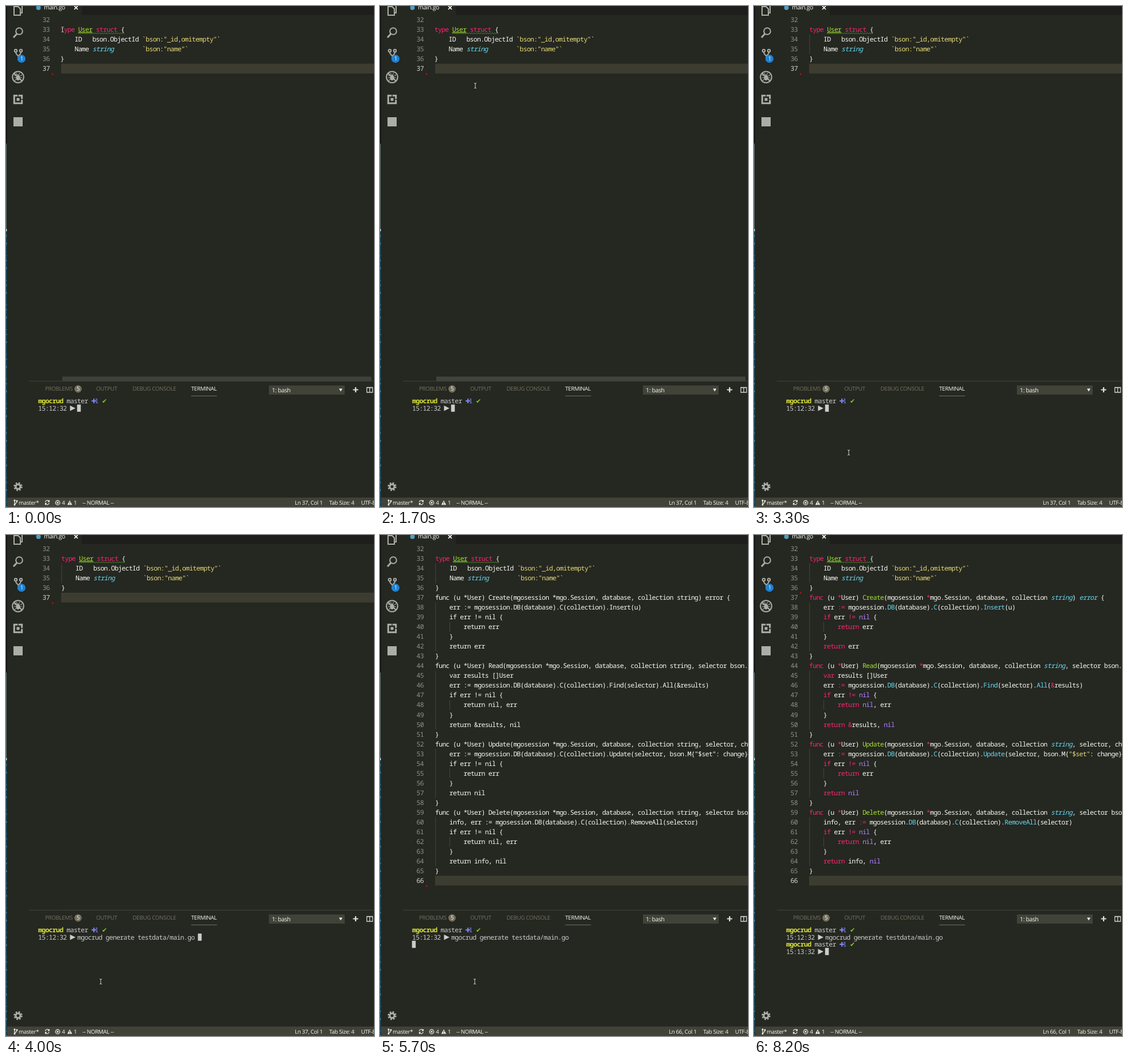
Write an HTML page that moves like this. It is 641 px wide and 874 px high and loops after 8.3 s.

```html
<!DOCTYPE html>
<html lang="en">
<head>
<meta charset="utf-8">
<title>Code generation in an editor</title>
<style>
html, body { margin: 0; width: 100%; height: 100%; overflow: hidden; background: #252721; }
svg { display: block; }
text { white-space: pre; text-rendering: geometricPrecision; fill: #f8f8f2; }
.code { font: 11.5px "Noto Sans Mono", "DejaVu Sans Mono", monospace; letter-spacing: -.71px; }
.ui { font: 9.8px "Open Sans", "Noto Sans", sans-serif; letter-spacing: -.035em; }
.big { font-size: 10.5px; }
.dim { fill: #75715e; }
.num { fill: #90908a; text-anchor: end; }
.on { fill: #d8d8d4; }
.term { fill: #ccc; }
.dir { fill: #dbe43a; font-weight: bold; }
.sym { font: 11px "DejaVu Sans", sans-serif; }
.git { fill: #7d85f5; }
.ok { fill: #7ecb20; }
.str { fill: #e6db74; }
.key { fill: #f92672; }
.nil { fill: #ae81ff; }
.typ { fill: #66d9ef; font-style: italic; }
.def { fill: #a6e22e; }
.call { fill: #66d9ef; }
.line { fill: none; stroke: #adada8; stroke-width: 2; }
.thick { stroke-width: 3; }
.thin { stroke-width: 1.2; }
</style>
</head>
<body>
<svg id="stage" width="641" height="874" viewBox="0 0 641 874"></svg>
<script>
const LOOP = 8300, COL = 6.19, LEFT = 96, PITCH = 17.03, BG = '#252721', ICON = '#adada8';
const lineY = n => 24 + PITCH * (n - 32);

const head = [
  'type User struct {',
  '    ID   bson.ObjectId `bson:"_id,omitempty"`',
  '    Name string        `bson:"name"`',
  '}'
];
const args = '(mgosession *mgo.Session, database, collection string';
const db = 'mgosession.DB(database).C(collection).';
const check = value => ['    if err != nil {', '        return ' + value, '    }'];
const body = [
  `func (u *User) Create${args}) error {`,
  `    err := ${db}Insert(u)`, ...check('err'), '    return err', '}',
  `func (u *User) Read${args}, selector bson.M)`,
  '    var results []User',
  `    err := ${db}Find(selector).All(&results)`, ...check('nil, err'), '    return &results, nil', '}',
  `func (u *User) Update${args}, selector, change`,
  `    err := ${db}Update(selector, bson.M{"$set": change})`, ...check('err'), '    return nil', '}',
  `func (u *User) Delete${args}, selector bson.M)`,
  `    info, err := ${db}RemoveAll(selector)`, ...check('nil, err'), '    return info, nil', '}'
];

const tokens = /(?<str>"[^"]*"|`[^`]*`)|(?<key>\b(?:func|type|struct|if|return|var)\b|:=|!=|[*&])|(?<nil>\bnil\b)|(?<typ>\b(?:string|error)\b)|(?<def>(?<=\) |type )\w+)|(?<call>(?<=\.)\w+(?=\())/g;
const esc = s => s.replace(/&/g, '&amp;');
const paint = code => code.replace(tokens, (word, ...rest) => {
  const groups = rest.at(-1);
  const kind = Object.keys(groups).find(k => groups[k]);
  return `<tspan class="${kind}">${esc(word)}</tspan>`;
});

const text = (x, y, cls, s) => `<text x="${x}" y="${y}" class="${cls}">${s}</text>`;
const path = (d, attrs = 'class="line"') => `<path d="${d}" ${attrs}/>`;
const rect = (x, y, w, h, fill, attrs = '') =>
  `<rect x="${x}" y="${y}" width="${w}" height="${h}" fill="${fill}" ${attrs}/>`;
const disc = (x, y, r, fill) => `<circle cx="${x}" cy="${y}" r="${r}" fill="${fill}"/>`;
const ring = (x, y, r, attrs = 'class="line"') => `<circle cx="${x}" cy="${y}" r="${r}" ${attrs}/>`;
const group = (id, inner) => `<g id="${id}">${inner}</g>`;

const listing = (lines, first, format) =>
  lines.map((s, i) => text(LEFT, lineY(first + i) + 4, 'code', format(s))).join('');
const guides = (lines, first) => lines.map((s, i) => {
  const depth = s.search(/\S/) / 4;
  return Array.from({ length: depth }, (_, k) =>
    rect(LEFT + .3 + k * 4 * COL, lineY(first + i) - PITCH / 2, 1, PITCH, '#464741')).join('');
}).join('');
const numbers = (from, to) => Array.from({ length: to - from + 1 }, (_, i) =>
  text(76, lineY(from + i) + 4, 'code num', from + i)).join('');

function underline() {
  const x = LEFT + 5 * COL;
  return path(`M${x} 48.5` + 'l2-1.6l2 1.6'.repeat(20), 'fill="none" stroke="#4f9a30" stroke-width=".9"') +
    rect(x, 45.8, 4 * COL, 1, '#a6e22e');
}

const prompt = (y, time) =>
  text(56, y + 4, 'code dir', 'mgocrud') + text(56 + 8 * COL, y + 4, 'code term', 'master') +
  text(148.5, y + 4, 'sym git', '✚') + text(154.5, y + 4, 'code git', '1') +
  text(167, y + 4, 'sym ok', '✔') +
  text(56, y + 16.5, 'code term', time) +
  path(`M111.5 ${y + 8}L121 ${y + 12.7}L111.5 ${y + 17.4}Z`, 'fill="#ccc"');

const activityBar =
  path('M18-6H24L28-2V12H25M14 1H21L25 5V16H14Z') +
  ring(23, 44, 5.8) + path('M19 48.5L13 55', 'class="line thick"') +
  ring(17, 78, 2.2) + ring(26, 78, 2.2) + path('M17 80Q17 84 21.5 87Q26 84 26 80M21.5 86V95') +
  disc(27, 92, 7, '#1f82d2') + text(24.8, 95.4, 'ui', '1') +
  ring(21, 124, 9.8) + `<ellipse cx="21" cy="125" rx="3.6" ry="5" fill="${ICON}"/>` +
  path('M14 120L17 122M28 120L25 122M14 125H28M15 130L18 128M27 130L24 128M18 117L20 120M24 117L22 120',
    'class="line thin"') +
  path('M14 117L28 131') +
  rect(14.3, 156.3, 13.4, 13.4, 'none', 'class="line thick"') +
  rect(18.5, 160.5, 5, 5, ICON) + path('M21 154V159M24.5 163H30', `stroke="${BG}" stroke-width="1.4"`) +
  rect(13, 194, 16, 16, ICON) +
  ring(21, 838.5, 6.2, 'class="line thick" stroke-dasharray="2.6 2.27"') +
  ring(21, 838.5, 4, 'class="line thick"');

const tabs =
  rect(40, 0, 601, 15.5, '#1e1f1c') + rect(40, 0, 92, 16, BG) +
  disc(56.5, 3, 4, '#4f9fc4') + text(66, 6.3, 'ui big', 'main.go') +
  path('M119 0L125 6M125 0L119 6', 'stroke="#fff" stroke-width="1.7"');

const panel =
  rect(40, 654, 601, 1, '#414339') +
  text(68, 671.3, 'ui dim', 'PROBLEMS') + disc(125.5, 668, 6.4, '#75715e') + text(123, 671.3, 'ui', '5') +
  text(157, 671.3, 'ui dim', 'OUTPUT') + text(220.5, 671.3, 'ui dim', 'DEBUG CONSOLE') +
  text(322.5, 671.3, 'ui', 'TERMINAL') + rect(322.5, 679.7, 45, 1, '#75715e') +
  rect(458, 662, 132, 16, '#414339') + text(463, 673.8, 'ui big', '1: bash') +
  path('M580 667.5H586L583 672.5Z', 'fill="#f0f0f0"') +
  path('M604.5 669.5H613.5M609 665V674', 'stroke="#e0e0dc" stroke-width="2.2"') +
  path('M628.5 665.5H638.5V674H628.5ZM633.5 665V674M628 665.8H639', 'fill="none" stroke="#d0d0cc" stroke-width="1.3"');

const white = 'fill="none" stroke="#f0f0ec" stroke-width="1.2"';
const statusBar =
  rect(2, 857.5, 639, 16.5, '#414339') +
  path('M15 863V870M19 864Q19 867 15 868.5', white) +
  disc(15, 862.5, 1.5, '#f0f0ec') + disc(19, 863.5, 1.5, '#f0f0ec') + disc(15, 870, 1.5, '#f0f0ec') +
  text(22, 869.6, 'ui', 'master*') +
  path('M68.5 865.5A3.4 3.4 0 0 1 75 864.5M75.3 862V865H72.6M75.2 867A3.4 3.4 0 0 1 68.8 868M68.5 870.5V867.5H71', white) +
  ring(90, 866.5, 3.8, white) + path('M88.3 864.8L91.7 868.2M91.7 864.8L88.3 868.2', white) +
  text(97.3, 869.6, 'ui', '4') +
  path('M111 862.5L115.2 870.2H106.8Z', 'fill="#f0f0ec"') + rect(110.4, 865, 1.2, 2.6, '#414339') +
  rect(110.4, 868.3, 1.2, 1.1, '#414339') +
  text(118, 869.6, 'ui', '1') + text(133, 869.6, 'ui', '-- NORMAL --') +
  `<text id="position" x="503" y="869.6" class="ui"></text>` +
  text(563, 869.6, 'ui', 'Tab Size: 4') + text(618.5, 869.6, 'ui', 'UTF-8');

const desktop =
  rect(0, 0, 1.5, 240, '#0b0c10') + rect(0, 240, 1, 149, '#66767c') + rect(0, 389, 1.5, 4, '#c8d4d8') +
  rect(0, 393, 1.4, 481, '#184a62') +
  path('M.7 400V874', 'stroke="#3f87a6" stroke-width="1.4" stroke-dasharray="2 11 3 19 1 7"');

const beam = 'M-2-4.5Q0-4.5 0-3.3Q0-4.5 2-4.5M0-4V4M-2 4.5Q0 4.5 0 3.3Q0 4.5 2 4.5';
const $ = id => document.getElementById(id);

$('stage').innerHTML =
  rect(0, 0, 641, 874, BG) + desktop + tabs + activityBar +
  rect(LEFT, 0, 545, PITCH, '#3d3c30', 'id="current"') +
  numbers(32, 36) + group('moreNumbers', numbers(37, 65)) +
  `<text id="active" x="76" class="code num on"></text>` +
  path('M80-2L83.5 0L80 2Z', 'id="marker" fill="#a81818"') +
  group('headGuides', guides(head, 33)) +
  group('head', listing(head, 33, paint) + underline()) +
  group('bodyGuides', guides(body, 37)) +
  group('plain', listing(body, 37, esc)) + group('lit', listing(body, 37, paint)) +
  rect(98, 646.5, 538.5, 7.5, '#42433d', 'id="scroll"') +
  panel + prompt(689, '15:12:32') +
  group('command', text(56 + 11 * COL, 705.5, 'code term', 'mgocrud generate testdata/main.go')) +
  group('done', prompt(714, '15:13:32')) +
  rect(0, 0, 6.5, 12.5, '#ccc', 'id="caret"') + statusBar +
  group('beam', path(beam, 'fill="none" stroke="#1c1d19" stroke-width="2.6"') +
    path(beam, 'fill="none" stroke="#dcdcd8"')) +
  path('M0 0V11L2.6 8.6L4.4 12.6L6.2 11.8L4.5 8H8Z', 'id="arrow" fill="#fff" stroke="#222" stroke-width=".7"');

// Each entry holds from its time until the next one.
const mouse = [
  [0, 98.5, 41], [600, 109, 43], [700, 104, 42], [800, 92, 43], [900, 91, 44],
  [1100, 96, 62], [1200, 108, 110], [1300, 124, 165], [1400, 135, 204],
  [1600, 152, 165], [1700, 166, 139], [2000, 150, 112], [2100, 126, 90],
  [2200, 108, 100], [2300, 101, 107], [2500, 140, 420], [2600, 165, 767],
  [2800, 165, 774], [2900, 165, 778], [3000, 165, 779],
  [6300, 172, 690], [6400, 196, 450], [6500, 206, 351.5], [6900, 110, 215], [7000, 22, 86]
];
const fade = [
  [0, .9], [200, 1], [2800, .7], [2900, .4], [3000, .2], [3300, .07],
  [5600, 0], [5800, 1], [7300, .3], [7600, 0]
];
const at = (steps, t) => steps.findLast(s => s[0] <= t);
const show = (id, on) => $(id).style.display = on ? '' : 'none';
const move = (id, x, y) => $(id).setAttribute('transform', `translate(${x} ${y})`);

function draw(t) {
  const focused = t >= 2000, generated = t >= 5700, lit = t >= 5800, done = t >= 5900;
  const line = generated ? 66 : 37;

  move('head', focused ? .3 : -1.3, 0);
  show('headGuides', focused);
  show('moreNumbers', generated);
  show('bodyGuides', generated);
  show('plain', generated && !lit);
  show('lit', lit);
  move('current', 0, lineY(line) - PITCH / 2);
  $('active').textContent = line;
  $('active').setAttribute('y', lineY(line) + 4);
  move('marker', 0, lit ? 101 : lineY(line) + 9.5);
  $('position').textContent = `Ln ${line}, Col 1`;

  $('scroll').style.opacity = at(fade, t)[1];
  move('scroll', generated ? -2 : 0, 0);

  show('command', t >= 4000);
  show('done', done);
  const [col, row] = done ? [11, 3] : t >= 5600 ? [0, 2] : t >= 4000 ? [45, 1] : [11, 1];
  move('caret', 55.7 + col * COL, 682.8 + row * 12.5);

  const [, x, y] = at(mouse, t);
  show('beam', t < 7000);
  show('arrow', t >= 7000 && t < 7300);
  move('beam', x, y);
  move('arrow', x, y);
}

const start = performance.now();
function tick() {
  draw((performance.now() - start) % LOOP);
  requestAnimationFrame(tick);
}
tick();
</script>
</body>
</html>
```
